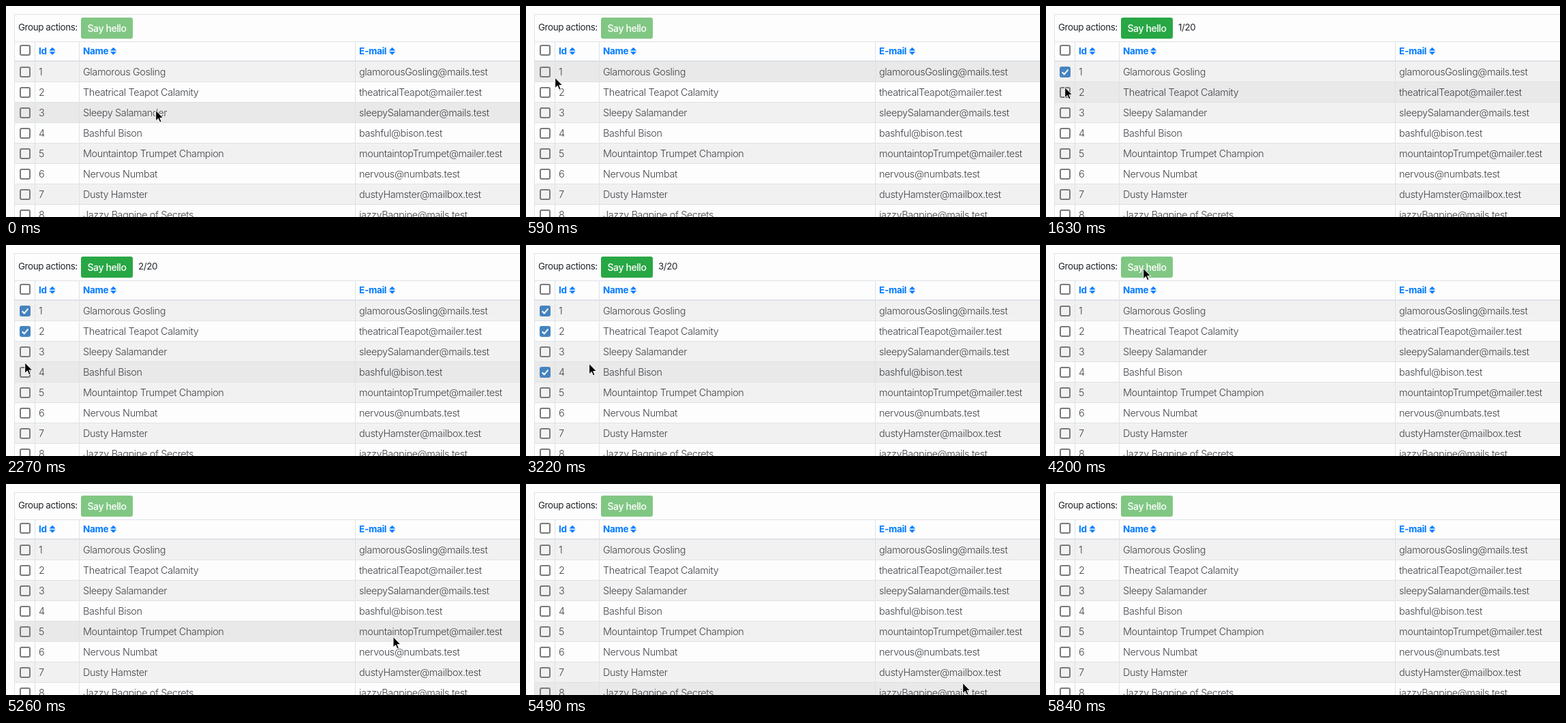
An HTML page for the animation above (6350 ms loop, 754 by 310 pixels).

```html
<!DOCTYPE html>
<html lang="en">
<head>
<meta charset="utf-8">
<title>Table with group actions</title>
<style>
  html, body { margin: 0; width: 100%; height: 100%; overflow: hidden; background: #fdfdfd; }
  svg { display: block; font: 300 14.4px Inter, sans-serif; letter-spacing: -.35px; fill: #404348; }
  .bar { font-size: 13.4px; font-weight: 400; letter-spacing: -.4px; fill: #212529; }
  .head { font-size: 13.5px; font-weight: 700; letter-spacing: -.3px; fill: #007bff; }
  .button { font-size: 14px; font-weight: 500; letter-spacing: -.4px; fill: #fff; text-anchor: middle; }
  .line { fill: #dee2e6; }
  .box { fill: none; stroke: #7a7a7a; stroke-width: 2; }
  .checked .box { fill: #4584bf; stroke: #4584bf; }
  .tick { fill: none; stroke: #fff; stroke-width: 2; visibility: hidden; }
  .checked .tick { visibility: visible; }
</style>
</head>
<body>
<svg id="stage" width="754" height="310" viewBox="0 0 754 310"></svg>
<script>
const LOOP = 6350, STEP = 58.3, ROW_TOP = 82, ROW_HEIGHT = 30;
const people = [
  ['Glamorous Gosling', 'glamorousGosling@mails.test'],
  ['Theatrical Teapot Calamity', 'theatricalTeapot@mailer.test'],
  ['Sleepy Salamander', 'sleepySalamander@mails.test'],
  ['Bashful Bison', 'bashful@bison.test'],
  ['Mountaintop Trumpet Champion', 'mountaintopTrumpet@mailer.test'],
  ['Nervous Numbat', 'nervous@numbats.test'],
  ['Dusty Hamster', 'dustyHamster@mailbox.test'],
  ['Jazzy Bagpipe of Secrets', 'jazzyBagpipe@mails.test'],
];

// Cursor path: time, x, y, easing exponent of the leg that ends here
const path = [
  [302, 219, 153, 1], [593, 42, 105, 1.2], [825, 32, 93, .7],
  [945, 32, 93, 1], [1340, 27, 96, 1],
  [1470, 27, 96, 1], [1642, 27, 119, 1], [1701, 27, 122, 1],
  [1876, 27, 122, 1], [2400, 27, 187, 1],
  [2867, 27, 187, 1], [3217, 92, 174, 1.3], [3567, 133, 56, 1],
  [3683, 141, 37, .8], [3800, 142, 34, 1],
  [4791, 142, 34, 1], [5257, 567, 224, 1.3], [5490, 640, 292, .8],
  [5840, 655, 312, 1],
];
const checkTimes = { 0: 1520, 1: 1930, 3: 2930 };
const HOVER = 3610, PRESS = 4090, CLEAR = 4200;

const rect = (x, y, w, h, cls) => `<rect class="${cls}" x="${x}" y="${y}" width="${w}" height="${h}"/>`;
const text = (x, y, s, cls = '') => `<text class="${cls}" x="${x}" y="${y}">${s}</text>`;
const checkbox = y => `<g class="check" transform="translate(20 ${y})">
  <rect class="box" x="1" y="1" width="14" height="14" rx="2"/>
  <path class="tick" d="M3.7 8.3l3 3 5.8-6.6"/></g>`;
const heading = (x, label, iconX) => text(x, 71, label, 'head') +
  `<path fill="#007bff" stroke="#007bff" stroke-width=".6" stroke-linejoin="round"
    d="M${iconX} 65.2l4-4.1 4 4.1zm0 2.2l4 4.1 4-4.1z"/>`;

const rowY = i => ROW_TOP + ROW_HEIGHT * i;
const rows = people.map(([name, mail], i) => {
  const y = rowY(i);
  return rect(12, y, 742, 29, 'row') + rect(12, y + 29, 742, 1, 'line') +
    checkbox(y + 7) + text(48, y + 20, i + 1) + text(113, y + 20, name) + text(518, y + 20, mail);
}).join('');

const stage = document.getElementById('stage');
stage.innerHTML = rows +
  rect(12, 12, 742, 1, 'line') + rect(12, 52, 742, 1, 'line') + rect(12, 80, 742, 2, 'line') +
  rect(12, 12, 1, 298, 'line') + [42, 107, 512].map(x => rect(x, 52, 1, 258, 'line')).join('') +
  text(18, 36, 'Group actions:', 'bar') +
  `<rect id="ring" x="108.5" y="15.5" width="79" height="34" rx="4.5" fill="none" stroke="#28a745" stroke-opacity=".5" stroke-width="3"/>
  <rect id="button" x="110" y="17" width="76" height="31" rx="3"/>` +
  text(148, 38, 'Say hello', 'button') +
  '<text id="count" class="bar" x="194" y="36"></text>' +
  heading(48, 'Id', 64) + heading(113, 'Name', 153.5) + heading(518, 'E-mail', 562.5) +
  checkbox(57) +
  '<path id="cursor" d="M.7 .3V15.8L4.3 12.4 6.7 18 9.1 17 6.8 11.5H11.7Z" fill="#000" stroke="#fff"/>';

const get = id => document.getElementById(id);
const ring = get('ring'), button = get('button'), count = get('count'), cursor = get('cursor');
const rowRects = [...stage.querySelectorAll('.row')];
const checks = [...stage.querySelectorAll('.check')];

function cursorAt(time) {
  const t = 360 + Math.floor((time - 360) / STEP + .3) * STEP;
  const i = path.findIndex(p => p[0] > t);
  if (i === 0) return path[0].slice(1, 3);
  if (i < 0) return [655, 330];
  const [t0, x0, y0] = path[i - 1], [t1, x1, y1, power] = path[i];
  const u = ((t - t0) / (t1 - t0)) ** power;
  return [x0 + (x1 - x0) * u, y0 + (y1 - y0) * u];
}

function buttonColor(t, active) {
  if (!active) return '#81c784';
  const u = Math.min(1, Math.max(0, (t - HOVER + 20) / 150));
  const mix = (a, b) => Math.round(a + (b - a) * u);
  return `rgb(${mix(40, 33)},${mix(167, 136)},${mix(69, 56)})`;
}

function draw(t) {
  const [x, y] = cursorAt(t);
  cursor.setAttribute('transform', `translate(${x} ${y})`);
  const hovered = y < 310 ? Math.floor((y - ROW_TOP) / ROW_HEIGHT) : -1;
  let total = 0;
  rowRects.forEach((row, i) => {
    row.style.fill = i === hovered ? '#e9e9e9' : i % 2 ? '#fdfdfd' : '#f1f1f1';
    const on = t >= checkTimes[i] && t < CLEAR;
    checks[i].classList.toggle('checked', on);
    total += on;
  });
  count.textContent = total ? `${total}/20` : '';
  button.style.fill = buttonColor(t, total > 0);
  ring.style.visibility = t >= PRESS && t < CLEAR ? 'visible' : 'hidden';
}

const start = performance.now();
function tick() {
  draw((performance.now() - start) % LOOP);
  requestAnimationFrame(tick);
}
tick();
</script>
</body>
</html>
```
